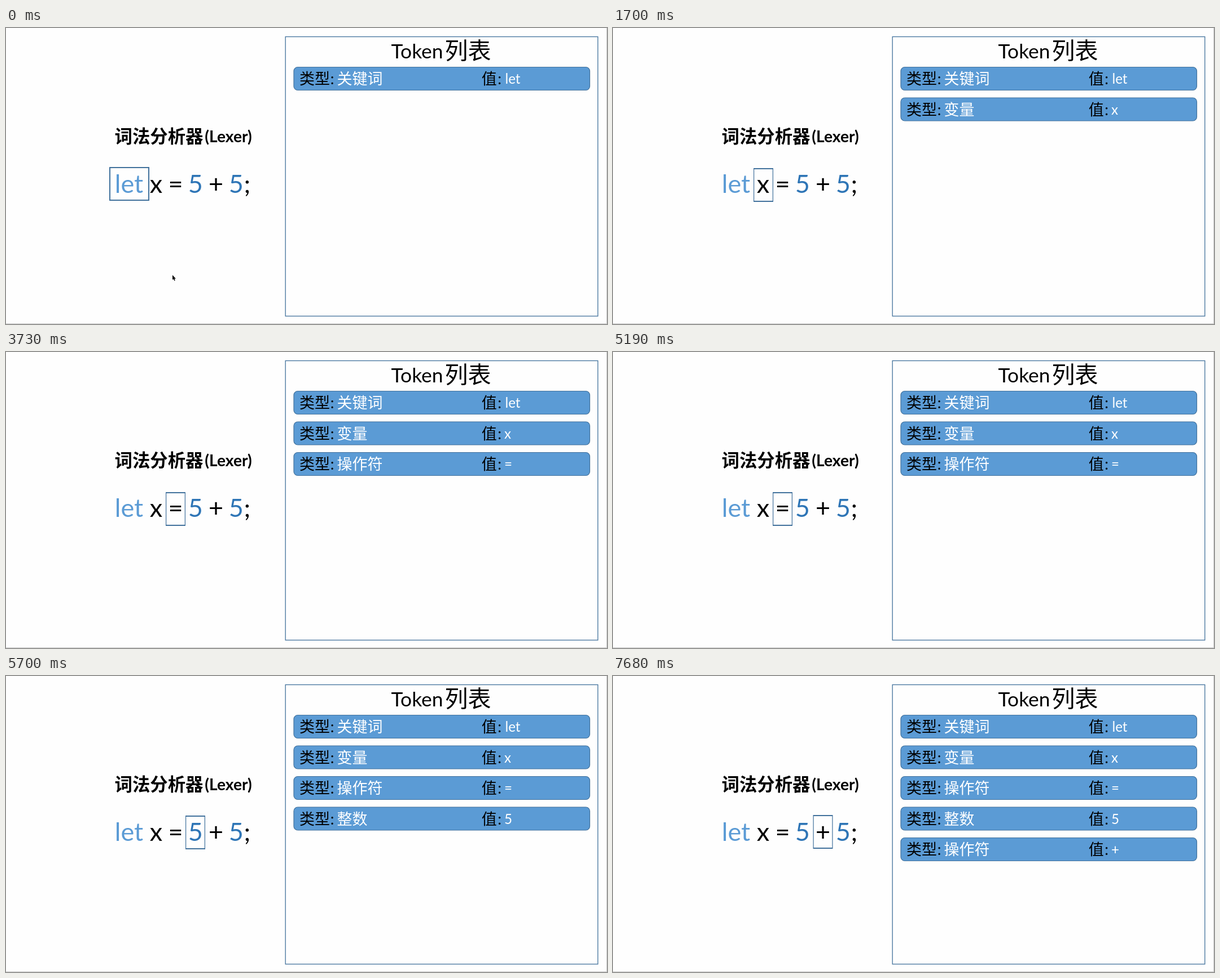
Write an HTML page that moves like this. It is 1065 px wide and 526 px high and loops after 8000 ms.

```html
<!DOCTYPE html>
<html lang="zh-CN">
<head>
<meta charset="utf-8">
<title>Lexer</title>
<style>
  html, body { margin: 0; width: 100%; height: 100%; overflow: hidden; background: #fefefe; }
  svg { display: block; width: 1065px; height: 526px; }
  text { font-family: Lato, "Noto Sans CJK SC", "Noto Sans CJK", sans-serif; }
  .mid { text-anchor: middle; }
  .bold { font-weight: 700; }
  .code { font-size: 45px; }
  .cjk { font-family: "Noto Sans CJK SC", "Noto Sans CJK", sans-serif; }
</style>
</head>
<body>
<svg id="stage" viewBox="0 0 1065 526">
  <path d="M1064.5 0V526M0 525.5H1065" stroke="#c8c8c8"/>
  <rect x="495.2" y="15.5" width="553.6" height="496.5" fill="none" stroke="#41719c" stroke-width="1.3"/>
</svg>
<script>
const LOOP = 8000, STEPS = 6, CURSOR_END = 490;
const BLUE = '#5b9bd5', DEEP = '#2e75b6', LINE = '#41719c';
const stage = document.getElementById('stage');

function add(tag, attrs, parent = stage, content = '') {
  const el = document.createElementNS('http://www.w3.org/2000/svg', tag);
  for (const key in attrs) el.setAttribute(key, attrs[key]);
  el.textContent = content;
  parent.append(el);
  return el;
}

function label(content, x, y, size, fill = '#000', cls = '', parent = stage) {
  return add('text', { x, y, fill, class: cls, 'font-size': size }, parent, content);
}

label('Token', 682.5, 53.5, 35.4);
label('列表', 777.5, 54.5, 41, '#000', 'cjk');
label('词法分析器', 192.5, 204, 31.4, '#000', 'cjk bold');
label('(Lexer)', 394, 203, 28.2, '#000', 'mid bold');

[['let', 218, BLUE], ['x', 266], ['=', 300.5], ['5', 335.7, DEEP],
 ['+', 372], ['5', 407.7, DEEP], [';', 427.3]]
  .forEach(([s, x, fill]) => label(s, x, 293, 45, fill, 'code mid'));

const rows = [['关键词', 'let', 898], ['变量', 'x', 889], ['操作符', '=', 890],
              ['整数', '5', 890], ['操作符', '+', 890]].map(([type, value, x], i) => {
  const g = add('g', { transform: `translate(0 ${i * 54.5})` });
  add('rect', { x: 510, y: 69.5, width: 524.5, height: 41, rx: 7, fill: BLUE, stroke: LINE, 'stroke-width': 1.2 }, g);
  label('类型', 520, 100, 27, '#000', 'cjk', g);
  label(':', 578, 100, 27, '#000', 'mid', g);
  label(type, 586.5, 100, 27, '#fff', 'cjk', g);
  label('值', 842.8, 100, 27, '#000', 'cjk', g);
  label(':', 874.5, 100, 27, '#000', 'mid', g);
  label(value, x, 99, 24.2, '#fff', 'mid', g);
  return g;
});

const marker = add('path', { fill: LINE, 'fill-rule': 'evenodd' });
const cursor = add('path', { d: 'M295 439V447.6L296.9 446L298.3 449.2L299.7 448.6L298.4 445.5H301Z' });

// Each box is x, y, width, height, side line weight.
const moves = [
  { start: 1210, end: 1700, from: [183, 247, 71, 60, 2], to: [249, 249, 35, 60, 1.2] },
  { start: 3290, end: 3730, from: [247, 248, 35, 60, 1.2], to: [283, 249, 35, 60, 1.2] },
  { start: 5190, end: 5700, from: [283, 249, 35, 60, 1.2], to: [318, 248, 35, 60, 1.2] },
  { start: 7200, end: 7680, from: [318, 247, 35, 60, 1.2], to: [354.5, 247, 35, 60, 1.2] }
];

const smooth = p => p * p * (3 - 2 * p);

function progress({ start, end }, t) {
  const p = Math.min(1, Math.max(0, (t - start) / (end - start)));
  return Math.floor(p * STEPS + 1e-6) / STEPS;
}

function drawMarker([x, y, w, h, side]) {
  marker.setAttribute('d', `M${x} ${y}h${w}v${h}h${-w}z` +
    `M${x + side} ${y + 2}h${w - 2 * side}v${h - 4}h${2 * side - w}z`);
}

function render(t) {
  let box = moves[0].from;
  moves.forEach((move, i) => {
    const p = progress(move, t);
    rows[i + 1].setAttribute('opacity', p);
    if (t >= move.start) box = move.from.map((v, k) => v + (move.to[k] - v) * smooth(p));
  });
  drawMarker(box);
  cursor.setAttribute('visibility', t < CURSOR_END ? 'visible' : 'hidden');
}

const origin = performance.now();
function tick() {
  render((performance.now() - origin) % LOOP);
  requestAnimationFrame(tick);
}
tick();
</script>
</body>
</html>
```
